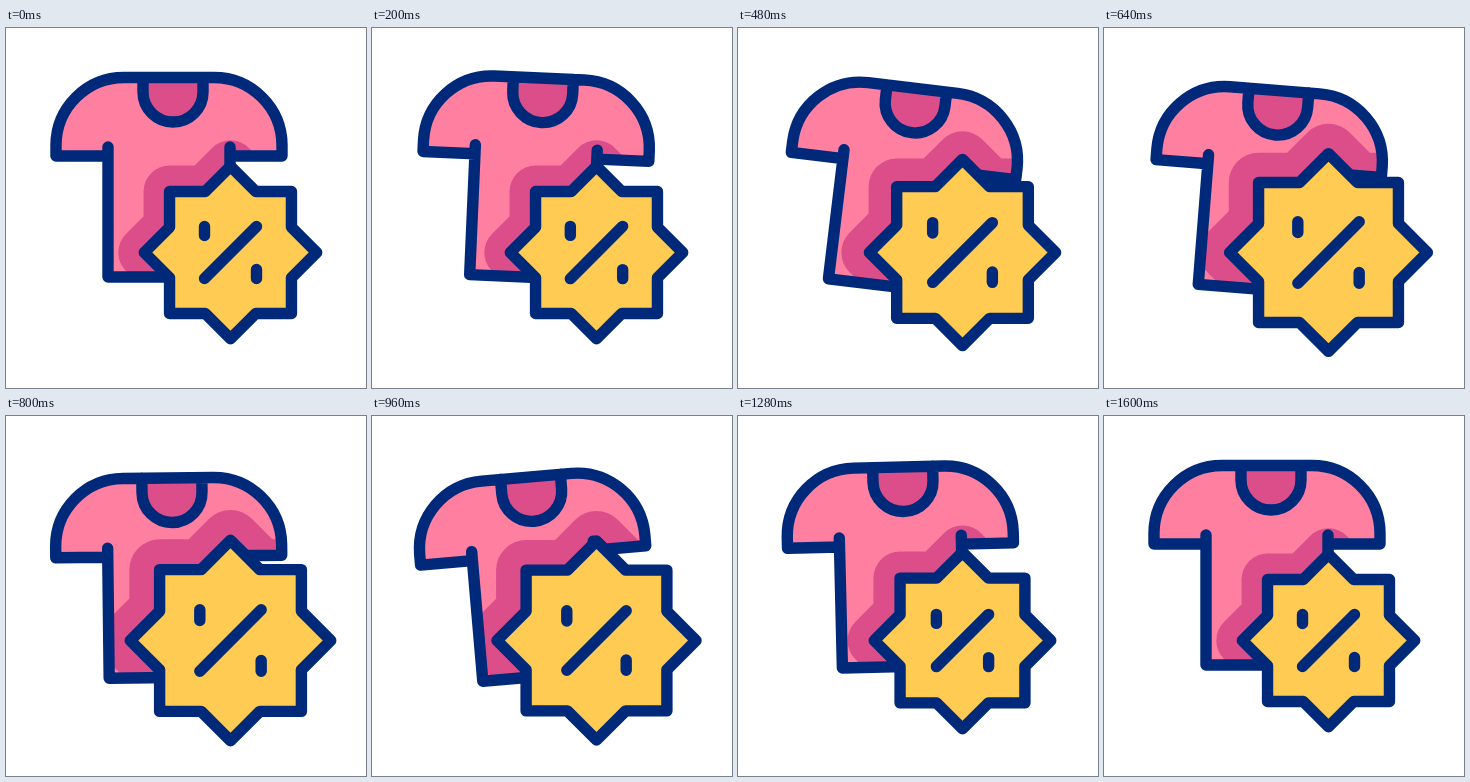
Animation, 360 px wide and 360 px high, one loop 1680 ms. Source, as an HTML page:

```html
<!DOCTYPE html>
<html lang="en">
<head>
<meta charset="utf-8">
<title>Shirt discount</title>
<style>
  html, body { margin: 0; width: 100%; height: 100%; overflow: hidden; background: #fff; }
  svg { display: block; width: 100%; height: 100%; }
  .line { fill: none; stroke: #00297a; stroke-width: 11.4; stroke-linecap: round; stroke-linejoin: round; }
</style>
</head>
<body>
<svg viewBox="0 0 360 360">
  <defs>
    <path id="cloth" d="M102 128H50V117A68 68 0 0 1 118 49.5H208A68 68 0 0 1 276 117V128H224V249H102Z"/>
    <clipPath id="inside"><use href="#cloth" class="shirt"/></clipPath>
  </defs>
  <use href="#cloth" class="shirt" fill="#ff7fa1"/>
  <g clip-path="url(#inside)">
    <path id="shade" fill="#dc4e89" stroke="#dc4e89" stroke-linejoin="round"/>
  </g>
  <g class="shirt">
    <path d="M137 49.5V64A30 30 0 0 0 197 64V49.5Z" fill="#dc4e89"/>
    <path class="line" d="M102 119V249H224V119M102 128H50V117A68 68 0 0 1 118 49.5H208A68 68 0 0 1 276 117V128H224M137 49.5V64A30 30 0 0 0 197 64V49.5"/>
  </g>
  <path id="badge" class="line" style="fill:#ffcb52"/>
  <path id="percent" class="line"/>
</svg>
<script>
const LOOP = 1680, STEP = 40, LAST = 1600, MID = 224.5;
const $ = id => document.getElementById(id);
const shirts = document.querySelectorAll('.shirt');

// Each track is a list of [time, value] with smooth easing between keys.
const tracks = {
  angle: [[0, 0], [490, 6.9], [1030, -5.5], [1400, 0]],
  drop: [[150, 0], [620, 12.5], [860, 12.5], [1400, 0]],
  badge: [[228, 1], [738, 1.163], [890, 1.163], [1405, 1]],
  percent: [[150, 1], [600, 1.18], [805, 1.18], [1330, 1]]
};

function valueAt(keys, t) {
  if (t <= keys[0][0]) return keys[0][1];
  for (let i = 1; i < keys.length; i++) {
    const [t0, a] = keys[i - 1], [t1, b] = keys[i];
    if (t < t1) {
      const u = (t - t0) / (t1 - t0);
      return a + (b - a) * u * u * (3 - 2 * u);
    }
  }
  return keys[keys.length - 1][1];
}

// Eight-pointed star: a square overlaid with the same square turned 45 degrees.
function star(scale) {
  const tip = 86.2 * scale, notch = tip / (1 + Math.SQRT2) * Math.sqrt(4 - 2 * Math.SQRT2);
  const pts = [];
  for (let i = 0; i < 16; i++) {
    const a = i * Math.PI / 8;
    const r = i % 2 ? notch * Math.SQRT2 / Math.sqrt(4 - 2 * Math.SQRT2) / Math.sqrt(2) / Math.sin(Math.PI / 8) * Math.SQRT1_2 : tip;
    pts.push((MID + r * Math.cos(a)).toFixed(2) + ' ' + (MID + r * Math.sin(a)).toFixed(2));
  }
  return 'M' + pts.join('L') + 'Z';
}

function percentPath(scale) {
  const p = (x, y) => (MID + x * scale) + ' ' + (MID + y * scale);
  return `M${p(-26, 26)}L${p(26, -26)}M${p(-26, -26)}L${p(-26, -17)}M${p(26, 17)}L${p(26, 26)}`;
}

function draw(now) {
  const t = Math.min(Math.floor(now % LOOP / STEP) * STEP, LAST);
  const v = name => valueAt(tracks[name], t);
  const pose = `translate(0 ${v('drop')}) rotate(${v('angle')} 163 149)`;
  shirts.forEach(el => el.setAttribute('transform', pose));
  const size = v('badge'), d = star(size);
  $('badge').setAttribute('d', d);
  $('shade').setAttribute('d', d);
  $('shade').setAttribute('stroke-width', 52 * size);
  $('percent').setAttribute('d', percentPath(v('percent')));
}

const start = performance.now();
function tick() {
  draw(performance.now() - start);
  requestAnimationFrame(tick);
}
draw(0);
tick();
</script>
</body>
</html>
```
